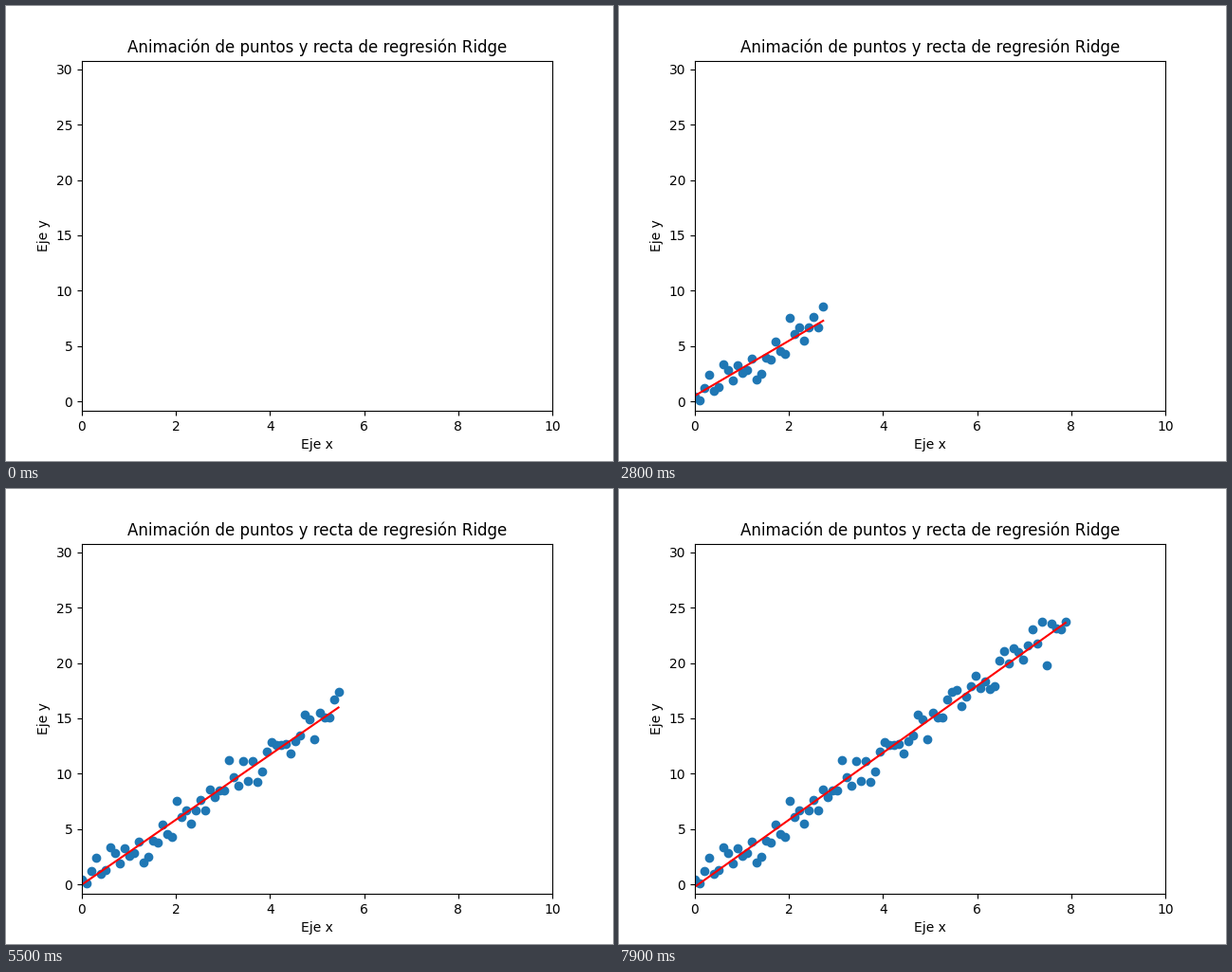
These frames come from a looping animation (640x480 px, 8 s). A matplotlib script:

```python
import numpy as np
import matplotlib.pyplot as plt
from matplotlib.animation import FuncAnimation

FRAMES = 80
INTERVAL = 100  # ms
ALPHA = 1.0

np.random.seed(42)
x = np.linspace(0, 10, 100)
y = 3 * x + np.random.randn(100)


def ridge(xs, ys, alpha=ALPHA):
    """Fitted values of a ridge regression with a free intercept."""
    dx = xs - xs.mean()
    slope = dx @ (ys - ys.mean()) / (dx @ dx + alpha)
    return ys.mean() + slope * dx


fig, ax = plt.subplots(figsize=(6.4, 4.8), dpi=100)
points = ax.scatter([], [])
line, = ax.plot([], [], color="red")
ax.set_xlim(0, 10)
ax.set_ylim(y.min() - 1, y.max() + 1)
ax.set_xlabel("Eje x")
ax.set_ylabel("Eje y")
ax.set_title("Animación de puntos y recta de regresión Ridge")


def update(n):
    xs, ys = x[:n], y[:n]
    points.set_offsets(np.column_stack([xs, ys]))
    line.set_data(xs, ridge(xs, ys) if n else ys)
    return points, line


anim = FuncAnimation(fig, update, frames=FRAMES, interval=INTERVAL,
                     init_func=lambda: update(0), repeat=True, repeat_delay=0)
plt.show()
```
